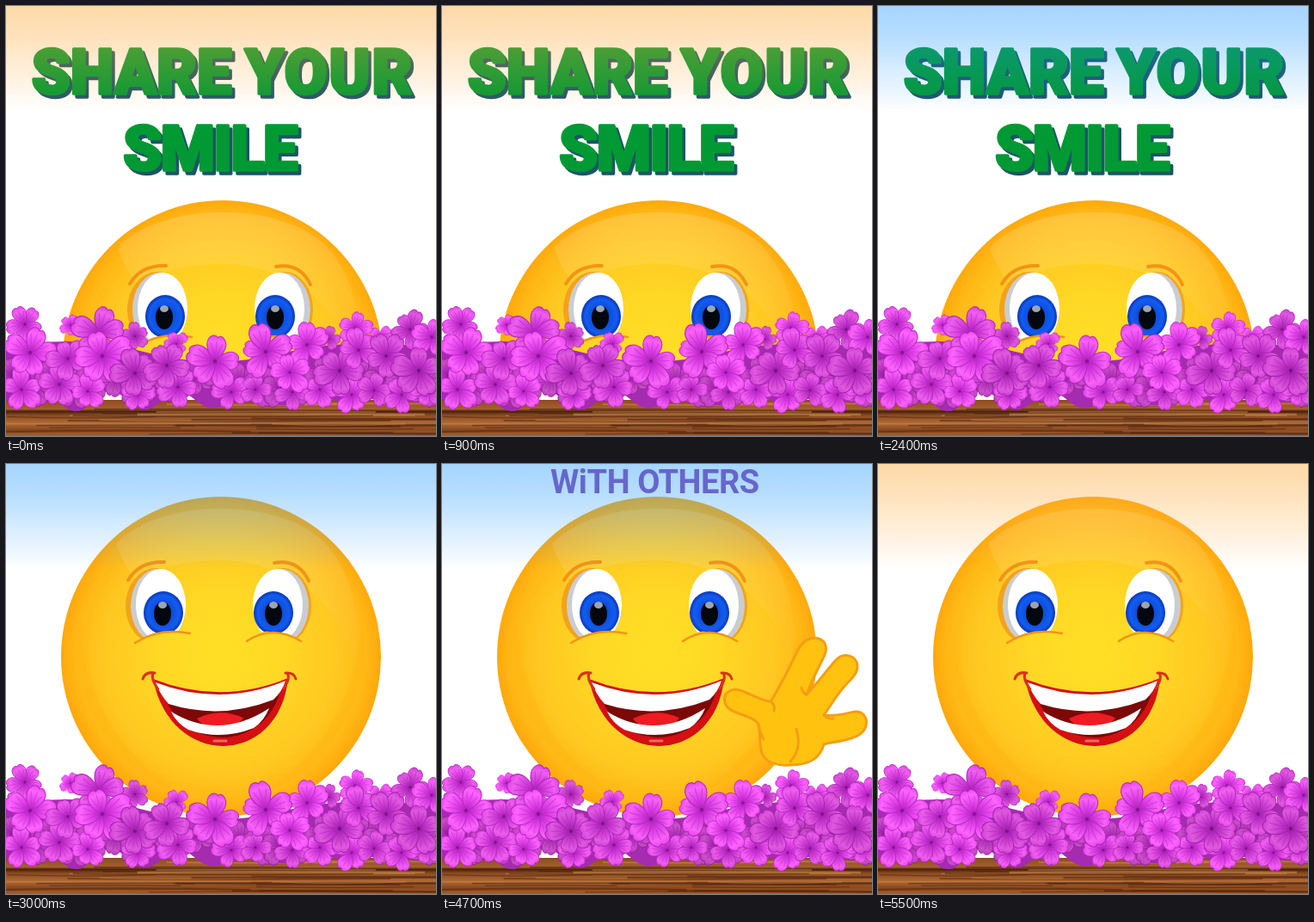
Recreate the animation shown at these times as an HTML page. Size 500 by 500 pixels, loop 6000 ms.

```html
<!DOCTYPE html>
<html lang="en">
<head>
<meta charset="utf-8">
<title>Share your smile</title>
<style>
  html, body { margin: 0; width: 100%; height: 100%; overflow: hidden; background: #fff; }
  svg { display: block; width: 100vw; height: 100vh; }
  .title { font: 900 72px Roboto, sans-serif; text-anchor: middle; stroke-width: 3.5; stroke-linejoin: round; }
  .loose { letter-spacing: 2px; }
  .tight { letter-spacing: -1.5px; }
  .sub { font: 700 38px Roboto, sans-serif; letter-spacing: -.4px; fill: #6666cc; }
  .face, .blue, .peach, .title, .wave { animation: 6s step-end infinite; }
  .face { animation-name: rise; }
  .blue { animation-name: blue; }
  .peach { animation-name: peach; }
  .title { animation-name: title; }
  .wave { animation-name: wave; }
  @keyframes rise { 0% { transform: translate(2px, 188px); } 50%, 100% { transform: none; } }
  @keyframes title { 0% { opacity: 1; } 50%, 100% { opacity: 0; } }
  @keyframes blue { 0% { opacity: 0; } 25% { opacity: 1; } 91.6667%, 100% { opacity: 0; } }
  @keyframes peach { 0% { opacity: 1; } 25% { opacity: 0; } 91.6667%, 100% { opacity: 1; } }
  @keyframes wave { 0% { opacity: 0; } 58.3333% { opacity: 1; } 91.6667%, 100% { opacity: 0; } }
</style>
</head>
<body>
<svg viewBox="0 0 500 500">
  <defs>
    <radialGradient id="skin" gradientUnits="userSpaceOnUse" cx="250" cy="222" r="188">
      <stop offset="0" stop-color="#ffe026"/>
      <stop offset=".4" stop-color="#ffd724"/>
      <stop offset=".72" stop-color="#ffc822"/>
      <stop offset=".9" stop-color="#ffb816"/>
      <stop offset="1" stop-color="#ffa60a"/>
    </radialGradient>
    <linearGradient id="gloss" x1="0" y1="0" x2="0" y2="1">
      <stop offset="0" stop-color="#fff" stop-opacity=".16"/>
      <stop offset=".6" stop-color="#fff" stop-opacity=".05"/>
      <stop offset="1" stop-color="#fff" stop-opacity="0"/>
    </linearGradient>
    <radialGradient id="iris">
      <stop offset="0" stop-color="#0c3bb0"/>
      <stop offset=".5" stop-color="#0d50e0"/>
      <stop offset=".8" stop-color="#125cf0"/>
      <stop offset="1" stop-color="#0a36b4"/>
    </radialGradient>
    <linearGradient id="blue" x1="0" y1="0" x2="0" y2="1">
      <stop offset="0" stop-color="#289bff" stop-opacity=".42"/>
      <stop offset=".3" stop-color="#289bff" stop-opacity=".33"/>
      <stop offset=".62" stop-color="#289bff" stop-opacity=".18"/>
      <stop offset=".87" stop-color="#289bff" stop-opacity=".07"/>
      <stop offset="1" stop-color="#289bff" stop-opacity="0"/>
    </linearGradient>
    <linearGradient id="peach" x1="0" y1="0" x2="0" y2="1">
      <stop offset="0" stop-color="#ffaa3c" stop-opacity=".45"/>
      <stop offset=".3" stop-color="#ffaa3c" stop-opacity=".34"/>
      <stop offset=".62" stop-color="#ffaa3c" stop-opacity=".19"/>
      <stop offset=".87" stop-color="#ffaa3c" stop-opacity=".07"/>
      <stop offset="1" stop-color="#ffaa3c" stop-opacity="0"/>
    </linearGradient>
    <linearGradient id="wood" x1="0" y1="0" x2="0" y2="1">
      <stop offset="0" stop-color="#8e4c22"/>
      <stop offset=".25" stop-color="#a4602c"/>
      <stop offset=".32" stop-color="#4a210c"/>
      <stop offset=".42" stop-color="#8a4a20"/>
      <stop offset=".65" stop-color="#b06a35"/>
      <stop offset=".82" stop-color="#8a4a20"/>
      <stop offset="1" stop-color="#a55f2e"/>
    </linearGradient>
    <radialGradient id="petal" gradientUnits="userSpaceOnUse" cx="0" cy="0" r="30">
      <stop offset="0" stop-color="#a81cb6"/>
      <stop offset=".35" stop-color="#d83ce0"/>
      <stop offset=".75" stop-color="#f662f6"/>
      <stop offset="1" stop-color="#e444e8"/>
    </radialGradient>
    <g id="flower-petal">
      <path d="M0 0C-9-7-15-21-7-28Q-2-31 1-27Q5-31 9-25C14-18 8-7 0 0Z" fill="url(#petal)" stroke="#b428c0" stroke-width="1"/>
      <path d="M0-4L0-23M-1-6L-7-21M1-6L7-20" fill="none" stroke="#c030cc" stroke-width="1" opacity=".6"/>
    </g>
    <clipPath id="leftEye"><path d="M135 110H220V197Q180 188 148 208H135Z"/></clipPath>
    <clipPath id="rightEye"><path d="M275 110H360V208H346Q312 188 284 198H275Z"/></clipPath>
    <clipPath id="aboveBed"><rect width="500" height="425"/></clipPath>
  </defs>

  <g clip-path="url(#aboveBed)">
    <g class="face">
      <circle cx="250" cy="224" r="186" fill="url(#skin)"/>
      <path d="M128 93C180 38 320 38 372 93C405 130 416 190 404 238C400 170 330 112 250 112C205 112 172 122 151 137Q137 118 128 93Z" fill="url(#gloss)"/>
      <path d="M86 185C72 270 126 362 214 388C140 350 94 280 86 185ZM414 185C428 270 374 362 286 388C360 350 406 280 414 185Z" fill="#ffae10" opacity=".3"/>

      <g clip-path="url(#leftEye)">
        <ellipse cx="174" cy="165" rx="35" ry="44" fill="#f3a21c"/>
        <ellipse cx="177" cy="165" rx="32" ry="43" fill="#c9cdd2"/>
        <ellipse cx="180" cy="164" rx="29" ry="42" fill="#fff"/>
        <ellipse cx="183" cy="173" rx="23" ry="25" fill="url(#iris)"/>
        <ellipse cx="182" cy="174" rx="10" ry="14" fill="#05070f"/>
        <ellipse cx="182" cy="164" rx="5" ry="4" fill="#9aa6b4"/>
      </g>
      <g clip-path="url(#rightEye)">
        <ellipse cx="322" cy="165" rx="33" ry="44" fill="#f3a21c"/>
        <ellipse cx="320" cy="165" rx="32" ry="43" fill="#c9cdd2"/>
        <ellipse cx="316" cy="164" rx="29" ry="42" fill="#fff"/>
        <ellipse cx="311" cy="173" rx="23" ry="25" fill="url(#iris)"/>
        <ellipse cx="311" cy="174" rx="10" ry="14" fill="#05070f"/>
        <ellipse cx="311" cy="164" rx="5" ry="4" fill="#9aa6b4"/>
      </g>
      <g fill="none" stroke="#f29416" stroke-width="4" stroke-linecap="round">
        <path d="M142 135Q155 113 184 114M312 115Q340 110 352 136"/>
        <path d="M150 208Q178 190 214 197M280 206Q310 186 343 206" stroke-width="2.5"/>
      </g>

      <path d="M171 250Q250 281 328 249C318 352 192 356 171 250Z" fill="#d50f12"/>
      <path d="M181 262Q250 282 320 259C304 336 204 338 181 262Z" fill="#7c0808"/>
      <path d="M222 296Q248 283 276 295Q270 306 248 306Q228 306 222 296Z" fill="#ec1c22"/>
      <path d="M174 254Q250 283 325 252Q321 265 311 274Q250 298 189 279Q179 268 174 254Z" fill="#fff"/>
      <path d="M192 288Q248 322 306 284Q300 299 288 307Q250 322 212 309Q198 301 192 288Z" fill="#fff"/>
      <path d="M242 322H256" stroke="#f26a5c" stroke-width="3" stroke-linecap="round"/>
      <path d="M159 250Q162 241 173 243M171 243Q168 250 177 262M337 250Q335 242 325 243M327 243Q331 249 323 261" fill="none" stroke="#d8321a" stroke-width="3" stroke-linecap="round"/>
    </g>
  </g>

  <g class="title">
    <g fill="#1d5566" stroke="#1d5566" transform="translate(3.5 3.5)">
      <text x="146" y="102">SHARE</text><text class="loose" x="376" y="102">YOUR</text><text class="tight" x="237" y="191">SMILE</text>
    </g>
    <g fill="#009933" stroke="#009933">
      <text x="146" y="102">SHARE</text><text class="loose" x="376" y="102">YOUR</text><text class="tight" x="237" y="191">SMILE</text>
    </g>
  </g>

  <rect class="blue" width="500" height="122" fill="url(#blue)"/>
  <rect class="peach" width="500" height="122" fill="url(#peach)"/>

  <g class="wave">
    <text class="sub" x="126" y="34">WiTH OTHERS</text>
    <path d="M372 336C367 322 373 309 366 300C355 290 334 291 329 278C326 266 336 260 346 263C358 266 371 276 382 276C392 262 402 240 412 220C418 206 428 200 438 203C448 207 448 216 444 224C436 240 428 256 424 268C436 256 447 240 458 228C466 219 478 222 482 230C486 240 478 248 472 254C460 266 450 284 444 292C456 294 470 290 480 288C490 287 495 296 493 304C491 314 480 318 472 320C462 323 450 324 444 326C440 342 426 350 405 350C388 351 376 346 372 336Z" fill="#ffc30f" stroke="#f59d12" stroke-width="3" stroke-linejoin="round"/>
    <path d="M382 276Q388 281 386 287M424 268Q419 266 418 260M444 292Q449 297 455 296M405 346Q419 331 412 308M368 302Q369 312 374 320" fill="none" stroke="#f59d12" stroke-width="3" stroke-linecap="round"/>
  </g>

  <g id="plank">
    <rect y="458" width="500" height="42" fill="url(#wood)"/>
  </g>
  <path d="M0 398Q80 380 160 402T320 404T500 398V458Q480 464 460 458T420 459T380 458T340 460T300 457T260 460T220 458T180 460T140 458T100 460T60 457T20 460L0 458Z" fill="#a52bb0"/>
  <g id="flowers"></g>
</svg>
<script>
  const NS = 'http://www.w3.org/2000/svg';
  const plank = document.getElementById('plank');
  const bed = document.getElementById('flowers');
  let seed = 7;
  const rand = () => (seed = seed * 16807 % 2147483647) / 2147483647;

  function add(parent, tag, attrs) {
    const el = document.createElementNS(NS, tag);
    for (const key in attrs) el.setAttribute(key, attrs[key]);
    return parent.appendChild(el);
  }

  function flower(x, y, r, light = .9 + rand() * .14) {
    const g = add(bed, 'g', {
      transform: `translate(${x} ${y}) rotate(${rand() * 72}) scale(${r / 29})`
    });
    g.style.filter = `brightness(${light})`;
    for (let i = 0; i < 5; i++) {
      const size = .82 + rand() * .28;
      add(g, 'use', { href: '#flower-petal', transform: `rotate(${i * 72 + rand() * 22}) scale(${size})` });
    }
    add(g, 'circle', { r: 2, fill: '#861592' });
  }

  // Wood grain
  for (let i = 0; i < 26; i++) {
    const y = 463 + rand() * 36, x = rand() * 400 - 60, w = 150 + rand() * 300;
    add(plank, 'path', {
      d: `M${x} ${y}q${w / 2} ${rand() * 6 - 3} ${w} 0`, fill: 'none',
      stroke: i % 3 ? '#56270f' : '#cb8a4c', 'stroke-width': 1 + rand() * 1.6, opacity: .6
    });
  }

  // Shaded blooms behind, then the bright ones: x, y, radius
  for (let x = 8; x < 500; x += 24) flower(x, 425 + rand() * 20, 23, .82);
  [
    [75, 371, 14], [150, 384, 16], [198, 393, 15], [375, 387, 16], [435, 386, 17],
    [18, 446, 25], [62, 440, 24], [95, 448, 21], [153, 452, 20], [200, 443, 24],
    [262, 449, 22], [290, 446, 20], [333, 449, 21], [365, 446, 20], [402, 452, 22],
    [428, 447, 20], [460, 452, 20], [490, 448, 20],
    [22, 370, 23], [406, 374, 22], [470, 376, 23], [350, 394, 25], [495, 385, 24],
    [28, 403, 31], [72, 410, 24], [108, 380, 31], [112, 407, 34], [150, 427, 29], [187, 418, 27],
    [243, 413, 31], [302, 402, 31], [330, 426, 25], [388, 424, 30], [410, 400, 25],
    [442, 407, 27], [480, 424, 30]
  ].forEach(([x, y, r]) => flower(x, y, r));
</script>
</body>
</html>
```
